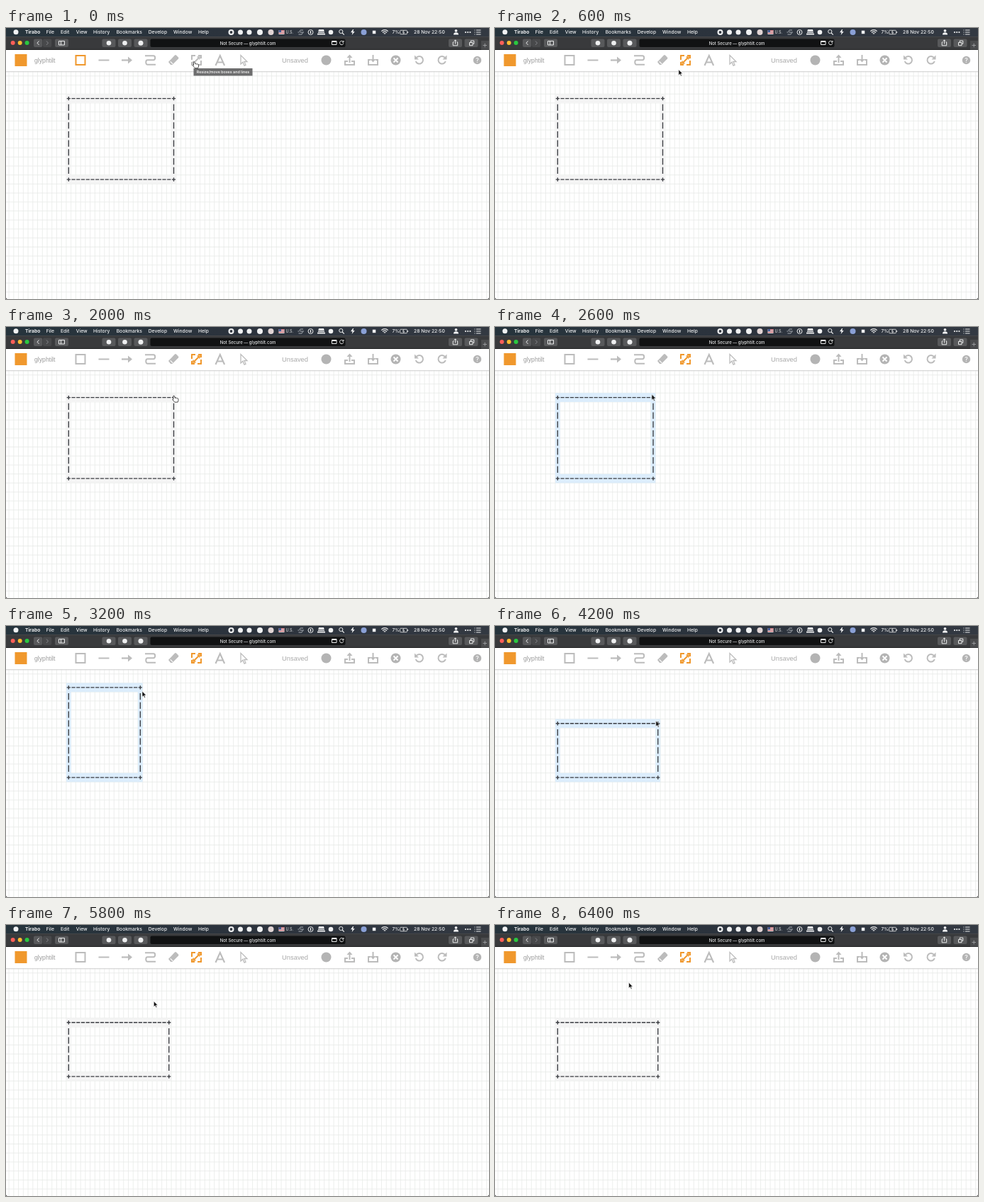
Recreate the animation shown at these times as an HTML page. Size 681 px wide and 383 px high, loop 6.6 s.

```html
<!DOCTYPE html>
<html lang="en">
<head>
<meta charset="utf-8">
<title>Resizing a text box</title>
<style>
html, body { margin: 0; width: 100%; height: 100%; overflow: hidden; background: #fff; }
svg { display: block; width: 681px; height: 383px; }
text { font-family: Inter, "Liberation Sans", sans-serif; font-weight: 500; }
.menu text { font-size: 6.75px; fill: #f1f2f3; }
.line { fill: none; stroke: #bcbcbc; stroke-width: 2; }
.thin { fill: none; stroke: #eceded; stroke-width: 1; }
.btn { fill: #58595b; }
.on { stroke: #f0982d; }
.sans { font-family: "Liberation Sans", Arial, sans-serif; font-weight: 400; }
</style>
</head>
<body>
<svg viewBox="0 0 681 383" xmlns="http://www.w3.org/2000/svg">
  <defs>
    <linearGradient id="bar">
      <stop offset="0" stop-color="#26343c"/>
      <stop offset=".5" stop-color="#2c333d"/>
      <stop offset="1" stop-color="#333942"/>
    </linearGradient>
    <linearGradient id="shade" x2="0" y2="1">
      <stop offset="0" stop-color="#c9c9c9"/>
      <stop offset="1" stop-color="#fff" stop-opacity="0"/>
    </linearGradient>
  </defs>
  <rect width="681" height="383" fill="#fff"/>

  <!-- canvas -->
  <path id="grid" fill="none" stroke="#e7eae7" stroke-width=".8"/>
  <path id="cells"/>
  <path id="chars" fill="none" stroke="#3b3d42" stroke-width="1.35"/>

  <!-- page toolbar -->
  <rect y="30" width="681" height="31" fill="#fff"/>
  <rect y="61" width="681" height="3" fill="url(#shade)"/>
  <rect x="12.5" y="37" width="17" height="17" fill="#f0982d"/>
  <text class="sans" x="40" y="48.6" font-size="8.7" fill="#9b9b9b">glyphtilt</text>
  <g class="line">
    <rect id="boxTool" x="98.5" y="39" width="13" height="13"/>
    <path d="M130.5 45.5h15"/>
    <path d="M163 45.5h10" stroke-width="2.2"/>
    <path d="M172 40.5l6 5-6 5z" fill="#bcbcbc" stroke="none"/>
    <path d="M196 39.3h12a2.2 3 0 0 1 0 6h-8.5a2.2 3.2 0 0 0 0 6.5h11.5"/>
    <path d="M229 48l9-9.5q1-.8 2 0l3 3q.8 1 0 2l-8.5 8.5h-2.500z" fill="#bcbcbc" stroke="none"/>
    <path d="M231.700 47.300l3.500 3.500" stroke="#fff" stroke-width="1.200"/>
    <g id="sizeTool">
      <path d="M267 39h-5v6M262 48v4h4M270 52h5v-6M275 43v-4h-4M264.500 49.500l8-8"/>
      <path d="M269.500 41h3.500v3.500M264 46.500v3.500h3.500" stroke-width="1.500"/>
    </g>
    <path d="M295.500 53l6.300-14 6.300 14M297.800 48.500h8" stroke-width="2.100"/>
    <path d="M331 38.500v12.500l3-2.800 2 5 2-.9-2-4.800h4z" stroke-width="1.300"/>
    <path d="M482 47h-4v5h13v-5h-4M484.500 49v-8"/>
    <path d="M480.500 42l4-4.500 4 4.500z" fill="#bcbcbc" stroke="none"/>
    <path d="M514 45h-3v7h13v-7h-3M517.500 38v7"/>
    <path d="M513.500 44l4 4.500 4-4.500z" fill="#bcbcbc" stroke="none"/>
    <path d="M578.500 42a5.300 5.300 0 1 1-.8 5"/>
    <path d="M576 38.500v6h6z" fill="#bcbcbc" stroke="none"/>
    <path d="M619 42a5.300 5.300 0 1 0 .8 5"/>
    <path d="M621.500 38.500v6h-6z" fill="#bcbcbc" stroke="none"/>
  </g>
  <text class="sans" x="389" y="49" font-size="9.4" fill="#a9a9a9">Unsaved</text>
  <circle cx="451.500" cy="45.500" r="7" fill="#b4b4b4"/>
  <circle cx="549.500" cy="45.500" r="7" fill="#b4b4b4"/>
  <path d="M546.500 42.500l6 6M552.500 42.500l-6 6" stroke="#fff" stroke-width="1.900"/>
  <circle cx="664.500" cy="45.500" r="5.700" fill="#b4b4b4"/>
  <text x="664.500" y="48.600" font-size="8.500" fill="#fff" text-anchor="middle" font-weight="700">?</text>

  <!-- browser bar -->
  <rect y="12" width="681" height="19" fill="#393a3c"/>
  <rect y="30" width="681" height="1" fill="#1d1e1f"/>
  <path d="M0 12.300h681" stroke="#505153" stroke-width=".7"/>
  <circle cx="9.700" cy="21" r="3" fill="#fb5f58"/>
  <circle cx="19.700" cy="21" r="3" fill="#fcbc2f"/>
  <circle cx="29.600" cy="21" r="3" fill="#2ac840"/>
  <g class="btn">
    <rect x="39" y="15.500" width="12.300" height="11.500" rx="2"/>
    <rect x="52" y="15.500" width="12.300" height="11.500" rx="2" fill="#48494b"/>
    <rect x="69" y="15.500" width="19" height="11.500" rx="2"/>
    <rect x="135.500" y="15.500" width="19" height="11.500" rx="2"/>
    <rect x="158" y="15.500" width="19" height="11.500" rx="2"/>
    <rect x="180.500" y="15.500" width="19" height="11.500" rx="2"/>
    <rect x="624" y="15.500" width="19" height="11.500" rx="2"/>
    <rect x="646.500" y="15.500" width="19" height="11.500" rx="2"/>
  </g>
  <rect x="670" y="18" width="11" height="12.500" fill="#4b4c4e"/>
  <rect x="203.500" y="15.500" width="275" height="11.500" rx="2" fill="#111213"/>
  <g class="thin" stroke-width=".9">
    <path d="M46.500 18.500l-2.500 2.700 2.500 2.700"/>
    <path d="M57 18.500l2.500 2.700-2.500 2.700" stroke="#85868a"/>
    <path d="M74.500 18.500h8v5.500h-8zM77.500 18.500v5.500"/>
    <path d="M459.500 18.500h6.500v5h-6.500zM459.500 19.500h6.500"/>
    <path d="M475.500 19.500a2.700 2.700 0 1 0 .4 2M476 17.800v2.200h-2.200"/>
    <path d="M631.500 20h-1.300v4.800h6.500v-4.800h-1.300M633.500 22.500v-5.500M631.800 18.500l1.700-1.700 1.700 1.700"/>
    <path d="M653.500 20.500h4.500v4.200h-4.500zM655.300 20v-2h4.500v4.300h-1.500"/>
    <path d="M672.500 24.500h5.500M675.200 21.700v5.500" stroke="#a9aaac" stroke-width=".8"/>
  </g>
  <g fill="#eeeff0">
    <circle cx="145" cy="21.200" r="3.300"/>
    <circle cx="167.500" cy="21.200" r="3.300"/>
    <circle cx="190" cy="21.200" r="3.500"/>
  </g>
  <text x="341" y="23.500" font-size="6" fill="#e4e5e6" text-anchor="middle">Not Secure — glyphtilt.com</text>

  <!-- menu bar -->
  <rect width="681" height="12" fill="url(#bar)"/>
  <g class="menu" id="menu">
    <circle cx="14" cy="5.800" r="3.500" fill="#f1f2f3"/>
    <g fill="#f1f2f3">
      <circle cx="317.500" cy="6" r="4"/>
      <circle cx="330.500" cy="6" r="3.500"/>
      <circle cx="343" cy="6" r="3.500"/>
      <circle cx="358" cy="6" r="4"/>
      <circle cx="373.500" cy="6" r="4" fill="#e2d5d5"/>
      <circle cx="458" cy="6" r="3.300"/>
      <path d="M441 2h7l.7 3h-8.400zM440 5.700h9v1.400h-9zM439 7.800h11v1.600h-11z"/>
      <path d="M489 2l-3 4.300h2.500l-.8 3.700 4-5h-2.500l1-3z"/>
      <circle cx="504.500" cy="6" r="4" fill="#8aa0d6"/>
      <rect x="516.800" y="3.700" width="4.500" height="4.500"/>
      <circle cx="634.500" cy="3.800" r="1.900"/>
      <path d="M631 9.500q0-3.300 3.500-3.300t3.500 3.300z"/>
      <circle cx="648" cy="6" r="1.100"/>
      <circle cx="651.200" cy="6" r="1.100"/>
      <circle cx="654.400" cy="6" r="1.100"/>
    </g>
    <rect x="315.800" y="4.300" width="3.400" height="3.400" rx=".8" fill="#30363f"/>
    <rect x="384.500" y="3" width="8" height="6" fill="#e8e2e3"/>
    <path d="M384.500 3.500h8M384.500 5.500h8M384.500 7.500h8" stroke="#c4505a" stroke-width=".9"/>
    <rect x="384.500" y="3" width="3.500" height="3.200" fill="#465a93"/>
    <g class="thin">
      <path d="M419 3h-4q-2 1.500 0 3h2.500q1.500 1.500-.5 3h-4.500M411.500 6h2M418 6h2" stroke="#a7acb2"/>
      <circle cx="429.500" cy="6" r="3.500"/>
      <path d="M429.500 4v4" stroke-width="1.400"/>
      <circle cx="472.300" cy="5" r="2.600"/>
      <path d="M474.200 7l2.600 2.600" stroke-width="1.200"/>
      <path d="M529.300 4.700a6.500 6.500 0 0 1 9.400 0M531 6.500a4 4 0 0 1 6 0M532.700 8.200a1.800 1.800 0 0 1 2.600 0" stroke-width="1.200"/>
      <rect x="555.500" y="3.300" width="10" height="5.400" rx="1" stroke-width=".8"/>
      <path d="M566.700 5v2M560.800 3.500l-1.300 2.700h2l-1.300 2.500" stroke-width=".9"/>
      <path d="M660.500 3h1M663 3h6.500M660.500 6h1M663 6h6.500M660.500 9h1M663 9h6.500" stroke-width="1.200"/>
    </g>
  </g>

  <g id="tip">
    <rect x="264.500" y="57" width="83" height="10.500" fill="#6d6d6e"/>
    <text x="306" y="64" font-size="5.400" fill="#fff" text-anchor="middle">Resize/move boxes and lines</text>
  </g>
  <path d="M0 383v-2.500q0 2.500 2.500 2.500zM681 383v-2.500q0 2.500-2.500 2.500z" fill="#222"/>

  <path id="arrow" d="M0 0v8l1.900-1.700 1.300 2.900 1.300-.6-1.300-2.800h2.500z" fill="#111" stroke="#fff" stroke-width=".6"/>
  <path id="hand" d="M-.9.800q.8-1.200 1.700 0l1 2.700q.8-.7 1.500 0 .9-.5 1.400.2 1-.4 1.300.5l.4 2.300-1 2.700h-4.200l-3-3.300q-.4-1 1.100-.8z" fill="#fff" stroke="#222" stroke-width=".8"/>
</svg>
<script>
const LOOP = 6600, STEP = 200;
const W = 6.735, H = 12.72, X0 = 84.95, Y0 = 93.24, BOTTOM = 9;
const PRESS = 2200, RELEASE = 5400, PICK = 400;
const $ = id => document.getElementById(id);

// time, x, y of the pointer tip
const path = [
  [0, 265.3, 47.5], [400, 265.3, 47.5], [1000, 240.5, 91], [1200, 239, 94],
  [2000, 236.7, 97], [2200, 236.7, 97], [3200, 192, 92.2],
  [4200, 226.8, 134], [5000, 228, 134], [5400, 228, 134], [6200, 188.6, 81.3]
];

function addMenu() {
  const items = [
    ["Tirabo", 27, 700], ["File", 56.7], ["Edit", 77], ["View", 98.7], ["History", 123],
    ["Bookmarks", 155.7], ["Develop", 200.7], ["Window", 236], ["Help", 271],
    ["7%", 544.5], ["28 Nov 22:50", 575], ["U.S.", 394.5, 400, 5.6]
  ];
  for (const [label, x, weight = 500, size = 6.75] of items) {
    const el = document.createElementNS("http://www.w3.org/2000/svg", "text");
    el.setAttribute("x", x);
    el.setAttribute("y", 8.4);
    el.style.cssText = `font-weight:${weight};font-size:${size}px`;
    el.textContent = label;
    $("menu").append(el);
  }
}

function addGrid() {
  let d = "";
  for (let x = X0 % W; x < 681; x += W) d += `M${x.toFixed(2)} 61V383`;
  for (let y = Y0 - 3 * H; y < 383; y += H) d += `M0 ${y.toFixed(2)}H681`;
  $("grid").setAttribute("d", d);
}

function pointer(t) {
  const i = path.findIndex(p => p[0] > t);
  if (i < 0) return path[path.length - 1].slice(1);
  const [t0, x0, y0] = path[i - 1], [t1, x1, y1] = path[i];
  const u = (t - t0) / (t1 - t0), k = u * u * (3 - 2 * u);
  return [x0 + (x1 - x0) * k, y0 + (y1 - y0) * k];
}

function corner(t) {
  if (t < PRESS) return [22, 0];
  const [x, y] = pointer(Math.min(t, RELEASE));
  return [Math.floor((x - X0) / W), Math.floor((y - Y0) / H)];
}

function drawBox(right, top, held) {
  let cells = "", chars = "";
  const put = (c, r, kind) => {
    const x = X0 + c * W, y = Y0 + r * H, cx = x + W / 2, cy = y + H / 2;
    cells += `M${x} ${y}h${W}v${H}h${-W}z`;
    if (kind === "-") chars += `M${cx - 2.6} ${cy}h5.2`;
    if (kind === "+") chars += `M${cx - 2.6} ${cy}h5.2M${cx} ${cy - 2.7}v5.4`;
    if (kind === "|") chars += `M${cx} ${cy - 4.6}v9.2`;
  };
  for (const r of [top, BOTTOM])
    for (let c = 0; c <= right; c++) put(c, r, c % right ? "-" : "+");
  for (const c of [0, right])
    for (let r = top + 1; r < BOTTOM; r++) put(c, r, "|");
  $("cells").setAttribute("d", cells);
  $("cells").setAttribute("fill", held ? "#dcedfc" : "#f4f4f4");
  $("chars").setAttribute("d", chars);
}

function show(id, on) {
  $(id).style.display = on ? "" : "none";
}

function render(t) {
  const picked = t >= PICK;
  $("boxTool").setAttribute("class", picked ? "" : "on");
  $("sizeTool").setAttribute("class", picked ? "on" : "");
  show("tip", !picked);
  drawBox(...corner(t), t >= PRESS && t < RELEASE);

  const hand = t <= 400 || (t >= 1000 && t < PRESS);
  const [x, y] = pointer(t);
  for (const id of ["hand", "arrow"])
    $(id).setAttribute("transform", `translate(${x.toFixed(2)} ${y.toFixed(2)})`);
  show("hand", hand);
  show("arrow", !hand);
}

function tick() {
  const t = performance.now() % LOOP;
  render(Math.floor(t / STEP) * STEP);
  requestAnimationFrame(tick);
}

addMenu();
addGrid();
tick();
</script>
</body>
</html>
```
